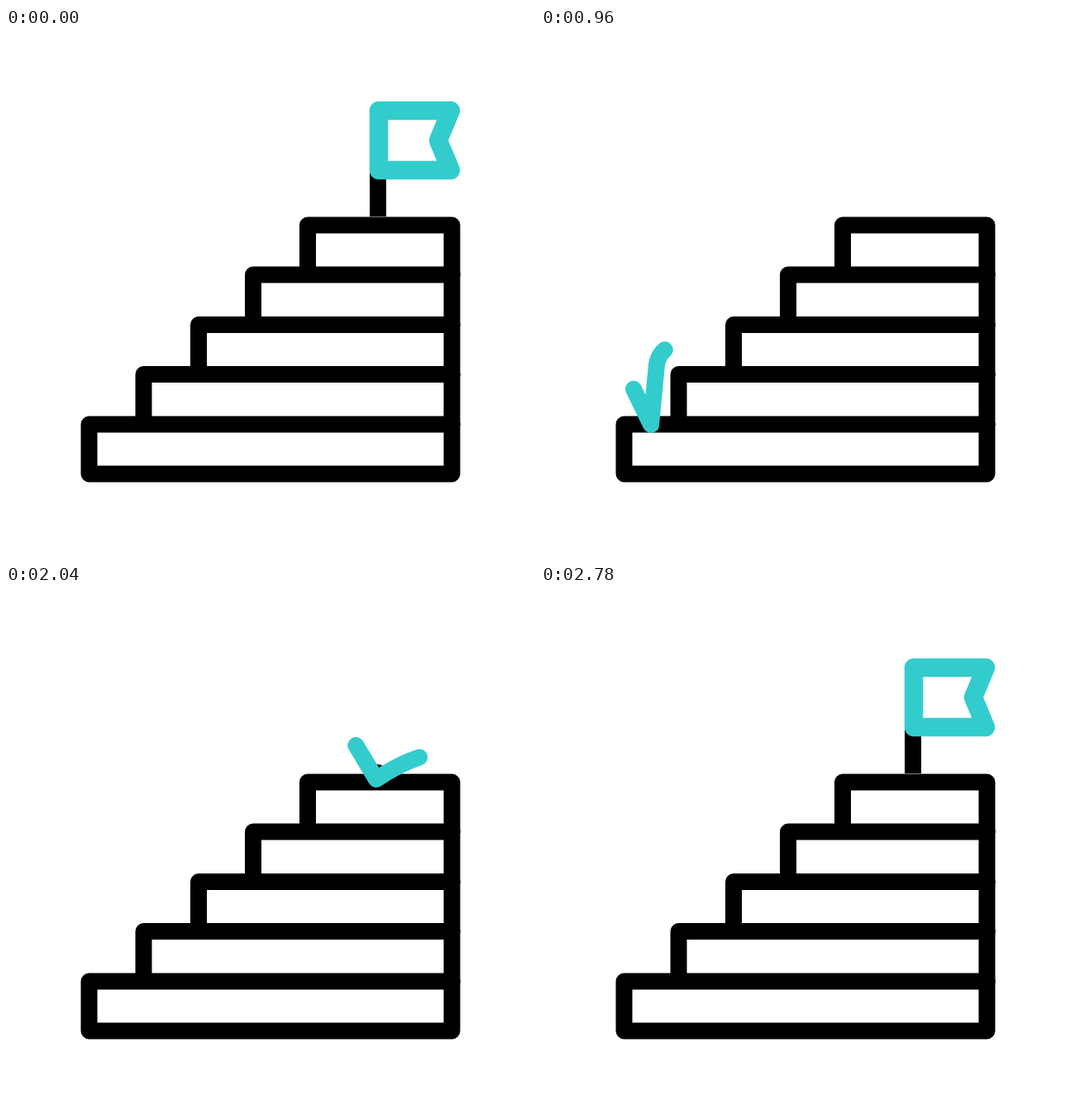
An HTML page without scripts for the animation above (3600 ms loop, 640x640 px).

```html
<!DOCTYPE html>
<html lang="en">
<head>
<meta charset="utf-8">
<title>Steps to the flag</title>
<style>
  html, body { margin: 0; width: 100%; height: 100%; overflow: hidden; background: #fff; }
  svg { display: block; width: 100%; height: 100%; }
  path { fill: none; stroke-linecap: round; stroke-linejoin: round; }
  .stairs { stroke: #000; stroke-width: 20; }
  .hop, .flag { stroke: #3cc; }
  .hop { stroke-width: 20; animation: hop 3.6s linear infinite; }
  .flag { stroke-width: 22.5; animation: flag 3.6s cubic-bezier(.333, 0, .667, 1) infinite; }
  .pole { animation: pole 3.6s cubic-bezier(.333, 0, .667, 1) infinite; }

  /* dash length and distance travelled along the bouncing path */
  @keyframes hop {
    0%, 6.11% { stroke-dasharray: 0 2000; stroke-dashoffset: 0; }
    10% { stroke-dasharray: 25 2000; stroke-dashoffset: 0; }
    13.33% { stroke-dasharray: 60 2000; stroke-dashoffset: -12; }
    16.67% { stroke-dasharray: 92 2000; stroke-dashoffset: -46; }
    20.56% { stroke-dasharray: 123 2000; stroke-dashoffset: -105; }
    23.61% { stroke-dasharray: 134 2000; stroke-dashoffset: -169; }
    26.67% { stroke-dasharray: 142 2000; stroke-dashoffset: -241; }
    34.17% { stroke-dasharray: 156 2000; stroke-dashoffset: -440; }
    41.67% { stroke-dasharray: 172 2000; stroke-dashoffset: -636; }
    45.83% { stroke-dasharray: 165 2000; stroke-dashoffset: -744; }
    50% { stroke-dasharray: 149 2000; stroke-dashoffset: -850; }
    56.11% { stroke-dasharray: 111 2000; stroke-dashoffset: -998; }
    62.22% { stroke-dasharray: 62 2000; stroke-dashoffset: -1125; }
    65.56% { stroke-dasharray: 36 2000; stroke-dashoffset: -1180; }
    68.89% { stroke-dasharray: 17 2000; stroke-dashoffset: -1215; }
    72.22% { stroke-dasharray: 4 2000; stroke-dashoffset: -1233; }
    74.44% { stroke-dasharray: 1 2000; stroke-dashoffset: -1237; visibility: visible; }
    74.45%, 100% { stroke-dasharray: 0 2000; stroke-dashoffset: -1400; visibility: hidden; }
  }
  @keyframes flag {
    0%, 6.11%, 77.22%, 100% {
      transform: none;
      d: path("M451 100H538L523 136L538 172H451Z");
    }
    20.83%, 62.78% {
      transform: translateY(140px);
      d: path("M451 100H494L479 136L494 172H451Z");
    }
  }
  @keyframes pole {
    0%, 6.11%, 71.11%, 100% { transform: none; clip-path: inset(0 0 0 0); }
    20.83% { transform: translateY(140px); clip-path: inset(0 0 0 0); }
    20.84%, 53.33% { transform: translateY(140px); clip-path: inset(0 0 0 10px); }
  }
</style>
</head>
<body>
<svg viewBox="0 0 640 640">
  <clipPath id="above"><rect width="640" height="228"/></clipPath>
  <g clip-path="url(#above)">
    <rect class="pole" x="440" y="90" width="20" height="200" rx="10"/>
    <path class="flag" d="M451 100H538L523 136L538 172H451Z"/>
  </g>
  <path class="stairs" d="M540 479.5H100.5V539.5H539.5V238.5H365V298.5
    M540 298.5H299V359 M540 359H233V419 M540 419H166.5V479.5"/>
  <path class="hop" d="M-30 515C-10 515 13 512 24 485L57 401C65 381 89 389 100 412L133 480
    l7-73c3-17 16-24 28-24c13 0 22 8 26 17l5 19
    l7-73c3-17 16-24 28-24c13 0 22 8 26 17l5 19
    l7-73c3-17 16-24 28-24c13 0 22 8 26 17l7 17
    L353 175C355 162 367 152 380 152C392 152 402 159 407 167L448 235
    C470 220 490 211 505 207C525 201 545 198 565 196C583 195 600 195 617 196"/>
</svg>
</body>
</html>
```
